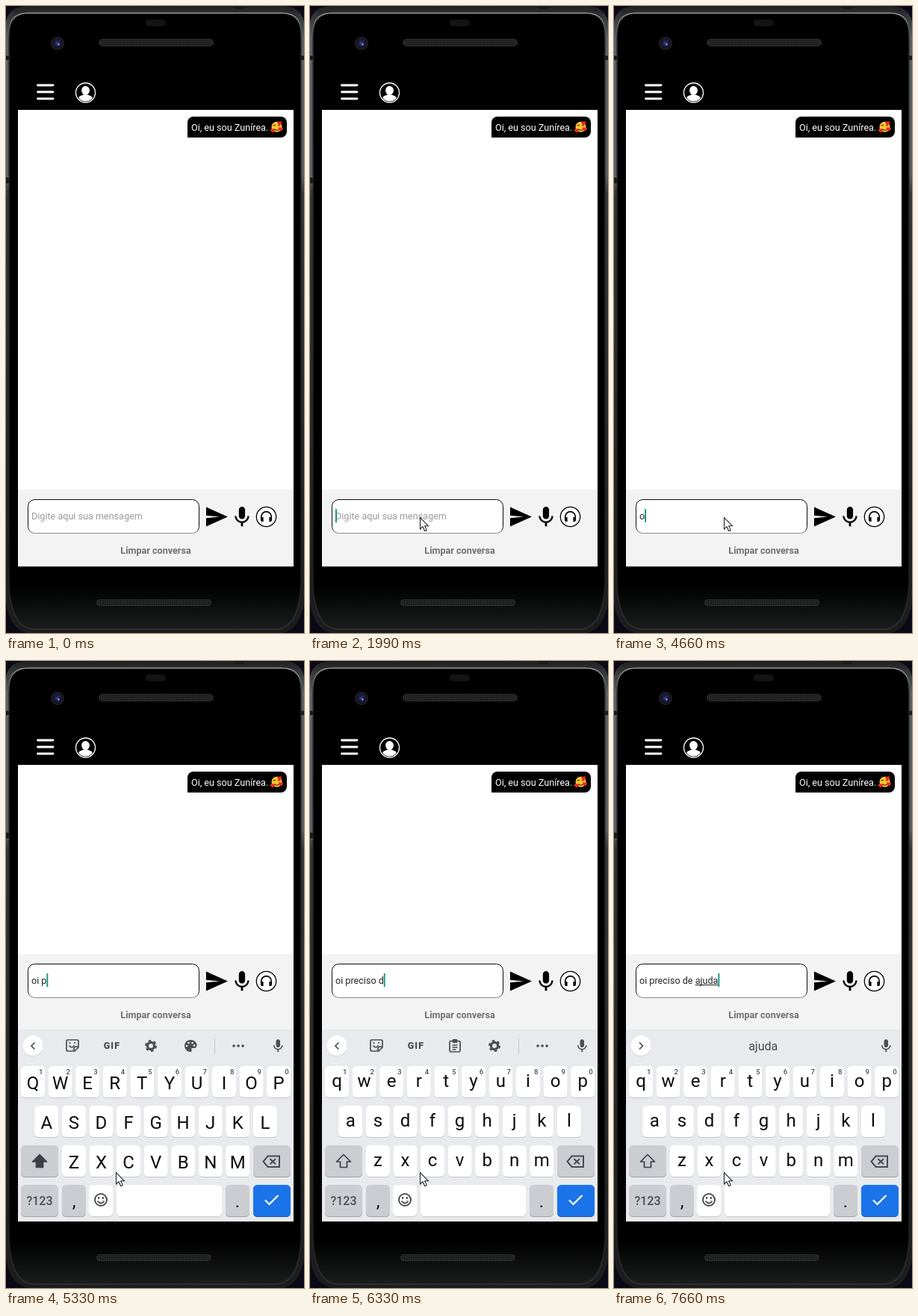
An HTML page for the animation above (7990 ms loop, 399 by 839 pixels).

```html
<!DOCTYPE html>
<html lang="pt">
<head>
<meta charset="utf-8">
<title>Chat</title>
<style>
html, body { margin: 0; width: 100%; height: 100%; overflow: hidden; background: #0a0916; }
svg { display: block; width: 399px; height: 839px; font-family: Roboto, sans-serif; }
text { white-space: pre; }
.msg { font-size: 12.6px; }
.mid { text-anchor: middle; }
.key { font-size: 24px; fill: #0b0b0c; }
.line { fill: none; stroke: #4a4d51; stroke-width: 1.7; }
.gray { fill: #4a4d51; }
.word { font-size: 16px; fill: #45484c; }
</style>
</head>
<body>
<svg id="stage" viewBox="0 0 399 839" xmlns="http://www.w3.org/2000/svg">
  <defs>
    <linearGradient id="rim" x2="0" y2="1">
      <stop offset="0" stop-color="#1d1f20"/>
      <stop offset=".05" stop-color="#5d6062"/>
      <stop offset=".27" stop-color="#5d6062"/>
      <stop offset=".3" stop-color="#343638"/>
      <stop offset="1" stop-color="#1b1c1d"/>
    </linearGradient>
    <linearGradient id="edge" x2="0" y2="1">
      <stop offset="0" stop-color="#9a9d9d"/>
      <stop offset=".04" stop-color="#2c2e2f"/>
      <stop offset=".9" stop-color="#1b1c1d"/>
      <stop offset="1" stop-color="#333536"/>
    </linearGradient>
    <linearGradient id="glass" x2="0" y2="1">
      <stop offset=".93" stop-color="#000"/>
      <stop offset="1" stop-color="#1c1d1d"/>
    </linearGradient>
    <linearGradient id="field" x2="0" y2="1">
      <stop offset=".85" stop-color="#0c0c0c"/>
      <stop offset="1" stop-color="#8c8c8c"/>
    </linearGradient>
    <radialGradient id="lens">
      <stop offset="0" stop-color="#414d96"/>
      <stop offset=".35" stop-color="#1b2048"/>
      <stop offset=".7" stop-color="#141520"/>
      <stop offset="1" stop-color="#222326"/>
    </radialGradient>
    <pattern id="mesh" width="3" height="3" patternUnits="userSpaceOnUse">
      <rect width="3" height="3" fill="#262727"/>
      <rect width="1.5" height="1.5" fill="#101111"/>
    </pattern>
    <clipPath id="face"><circle cx="106.5" cy="116" r="11.6"/></clipPath>
    <path id="mic" d="M12 14c1.66 0 3-1.34 3-3V5c0-1.66-1.34-3-3-3S9 3.34 9 5v6c0 1.66 1.34 3 3 3zm5.3-3c0 3-2.54 5.1-5.3 5.1S6.7 14 6.7 11H5c0 3.41 2.72 6.23 6 6.72V21h2v-3.28c3.28-.48 6-3.3 6-6.72z"/>
    <path id="heart" d="M0 3.6C-5 .2-3-3.4 0-1.2C3-3.4 5 .2 0 3.6z" fill="#ef2632"/>
    <g id="gear" fill="none" stroke="#4a4d51">
      <circle r="4.6" stroke-width="3.2"/>
      <circle r="7" stroke-width="2" stroke-dasharray="3.67"/>
    </g>
  </defs>

  <!-- phone -->
  <path d="M-1 30Q-1 0 30 0H369Q400 0 400 30V790Q396 840 362 840H37Q3 840-1 790z" fill="url(#rim)"/>
  <path d="M4 34Q5 9.500 30 9.500H369Q394 9.500 395 34V775Q392 834 360 834H39Q7 834 4 775z" fill="url(#glass)" stroke="url(#edge)" stroke-width="1.500"/>
  <path d="M0 66h4v7H0zM395 66h4v7h-4zM306 0h13v4h-13zM0 229h4v9H0z" fill="#17191a"/>
  <path d="M0 66h4M0 73h4M395 66h4M395 73h4M0 229h4M0 238h4" stroke="#696c6e"/>
  <rect x="187" y="18" width="27" height="9" rx="4" fill="#131314"/>
  <circle cx="69" cy="50" r="9" fill="url(#lens)"/>
  <circle cx="70.5" cy="51.5" r="1.2" fill="#8793e0"/>
  <g fill="url(#mesh)" stroke="#303131">
    <rect x="124.5" y="44.5" width="153" height="9" rx="4.5"/>
    <rect x="121.5" y="794.5" width="153" height="8" rx="4"/>
  </g>

  <!-- top bar -->
  <path d="M42.500 106h20.500M42.500 115h20.500M42.500 124h20.500" stroke="#fff" stroke-width="2.800" stroke-linecap="round"/>
  <circle cx="106.5" cy="116" r="13" fill="none" stroke="#fff" stroke-width="1.3"/>
  <g clip-path="url(#face)" fill="#fff">
    <ellipse cx="106.5" cy="113" rx="5.4" ry="6"/>
    <path d="M97 131v-7c0-3.500 4-4 7-5.500h5c3 1.500 7 2 7 5.500v7z"/>
  </g>

  <!-- chat -->
  <rect x="16" y="139" width="369" height="611" fill="#fff"/>
  <path d="M243 176V156a8 8 0 0 1 8-8h117a8 8 0 0 1 8 8v12a8 8 0 0 1-8 8z"/>
  <text class="msg" x="248" y="166.5" fill="#fff">Oi, eu sou Zunírea.</text>
  <circle cx="362.5" cy="161.8" r="7" fill="#fcc52c"/>
  <path d="M357.8 160.4q1.6-2.4 3.2 0M364 160.4q1.6-2.4 3.2 0M359 164.5q3.5 3.4 7 0" fill="none" stroke="#5d3610" stroke-width="1.1"/>
  <use href="#heart" x="357" y="166"/><use href="#heart" x="368" y="164"/><use href="#heart" x="366.3" y="156.2"/>

  <!-- composer -->
  <g id="composer">
    <rect x="16" y="647" width="369" height="103" fill="#f3f3f3"/>
    <rect x="29.5" y="660.5" width="229" height="45" rx="9" fill="#fff" stroke="url(#field)"/>
    <text id="hint" class="msg" x="34" y="687" fill="#9b9b9b">Digite aqui sua mensagem</text>
    <text id="draft" class="msg" x="34" y="687" fill="#222"></text>
    <g id="marks"></g>
    <rect id="caret" y="673" width="1.8" height="18" fill="#0a9080"/>
    <path transform="translate(265.2 666.2) scale(1.38 1.44)" d="M2 21L23 12 2 3v7.8L15 12 2 13.2z"/>
    <use href="#mic" transform="translate(299.4 667.3) scale(1.38)"/>
    <circle cx="348.5" cy="683.5" r="13.2" fill="#fff" stroke="#000" stroke-width="1.3"/>
    <path d="M341.7 686v-2.5a6.8 6.8 0 0 1 13.6 0v2.5" fill="none" stroke="#000" stroke-width="1.7"/>
    <path d="M341 684h3.6v6h-1.6a2 2 0 0 1-2-2zM356 684h-3.6v6h1.6a2 2 0 0 0 2-2z"/>
    <text class="msg mid" x="200.5" y="733" font-weight="700" fill="#707070">Limpar conversa</text>
  </g>

  <!-- keyboard -->
  <g id="keyboard">
    <rect x="16" y="493" width="369" height="257" fill="#e8eaed"/>
    <circle cx="36" cy="515.5" r="13.5" fill="#c9cbcf"/>
    <circle cx="36" cy="514.7" r="13.5" fill="#fff"/>
    <path id="chevron" class="line"/>
    <use href="#mic" class="gray" transform="translate(353.5 504.4) scale(.9)"/>
    <g id="tools">
      <path class="line" d="M83 507h12q2 0 2 2v8l-5 5h-9q-2 0-2-2v-11q0-2 2-2zM97 516h-3q-3 0-3 3v3"/>
      <path class="line" d="M84.5 514.5q3.5 5 7 0M85.5 510v2M92 510v2"/>
      <text class="mid gray" x="142" y="519.4" font-size="12.4" font-weight="800" letter-spacing="1.2">GIF</text>
      <use id="gearIcon" href="#gear" y="515"/>
      <g id="palette" class="gray">
        <path d="M247 507a8 8 0 0 0 0 16c2 0 2.2-1.6 1.5-2.5c-1-1.5 0-2.5 1.5-2.5h2c2 0 3.5-1.5 3.5-4c0-4-4-7-8.5-7z"/>
        <path d="M242 515h.1M244.5 511h.1M249.5 511h.1M252 514.5h.1" stroke="#e8eaed" stroke-width="2.6" stroke-linecap="round"/>
      </g>
      <g id="clip">
        <rect class="line" x="187" y="508.5" width="14" height="14.5" rx="1.5"/>
        <path class="line" d="M190.5 514h7M190.5 517h7M190.5 520h5"/>
        <rect class="gray" x="190.5" y="506" width="7" height="5" rx="1.5"/>
      </g>
      <path d="M279.5 505v20" stroke="#c4c7cb"/>
      <path d="M305 515h.1M311 515h.1M317 515h.1" stroke="#4a4d51" stroke-width="3.6" stroke-linecap="round"/>
    </g>
    <g id="words"></g>
    <g id="keys"></g>
    <path id="shift" d="M45 660.5l9.500 9.500h-5v7.500h-9V670h-5z" stroke="#3c4043" stroke-width="1.7" stroke-linejoin="round"/>
    <g class="line" style="stroke-width: 2">
      <path d="M350.500 662.500h15.500v14.500h-15.500l-6-7.250zM353.500 666.300l7.500 7M361 666.300l-7.500 7"/>
      <circle cx="127" cy="721" r="8"/>
      <path d="M122.500 722.500q4.500 6 9 0M124.200 717v3M129.800 717v3"/>
    </g>
    <path d="M347 721.500l5.500 5.500 12-12" fill="none" stroke="#fff" stroke-width="2.2"/>
  </g>

  <path id="pointer" d="M.5.5V16L4 12.700 6.600 18.500 9.200 17.400 6.700 11.700H11.300z" fill="#fff" stroke="#22242c" stroke-width="1.1"/>
</svg>
<script>
const LOOP = 7990, RED = "#e53238", INK = "#222";
const $ = id => document.getElementById(id);

function add(parent, tag, attrs, content = "") {
  const node = document.createElementNS("http://www.w3.org/2000/svg", tag);
  for (const name in attrs) node.setAttribute(name, attrs[name]);
  node.textContent = content;
  return parent.appendChild(node);
}

function show(id, on) { $(id).style.display = on ? "" : "none"; }

// Key caps and letters
const letters = [];
function keyCap(x, y, width, fill = "#fff") {
  const cap = { x, width, height: 42, rx: 5.5 };
  add($("keys"), "rect", { ...cap, y: y + 1, fill });
  add($("keys"), "rect", { ...cap, y: y + 1, opacity: 0.22 });
  add($("keys"), "rect", { ...cap, y, fill });
}
[["QWERTYUIOP", 20], ["ASDFGHJKL", 38.3], ["ZXCVBNM", 74.9]].forEach(([row, left], r) => {
  [...row].forEach((ch, i) => {
    const x = left + i * 36.57, y = 542 + r * 53;
    keyCap(x, y, 32);
    letters.push(add($("keys"), "text", { class: "key mid", x: x + 16, y: y + 30.5 }, ch));
    if (!r) add($("keys"), "text", { class: "mid gray", x: x + 26.7, y: y + 11, "font-size": 9.5, "font-weight": 500 }, (i + 1) % 10);
  });
});
const GRAY = "#cbcdd2";
[[20, 648, 50, GRAY], [331, 648, 50, GRAY], [20, 701, 50, GRAY], [75, 701, 32, GRAY],
 [111, 701, 32], [148, 701, 141], [294, 701, 32, GRAY], [331, 701, 50, "#1a73e8"]].forEach(k => keyCap(...k));
add($("keys"), "text", { class: "mid gray", x: 45, y: 727.5, "font-size": 16, "font-weight": 500 }, "?123");
add($("keys"), "text", { class: "key mid", x: 91, y: 731 }, ",");
add($("keys"), "text", { class: "key mid", x: 310, y: 731 }, ".");

// Each step overrides the one before; marks are [first, last, colour]
const steps = [
  [0, { pointer: null, text: "", caret: false, marks: [], keys: false, lower: false, clip: false, words: null }],
  [330, { pointer: [152, 688] }],
  [660, { pointer: [147, 684] }],
  [1320, { caret: true }],
  [1650, { caret: false }],
  [1990, { caret: true }],
  [2660, { caret: false }],
  [2990, { caret: true }],
  [3660, { caret: false }],
  [3990, { caret: true }],
  [4660, { text: "o" }],
  [5330, { text: "oi p", keys: true }],
  [5660, { text: "oi pre", marks: [[0, 2, RED], [3, 6, INK]], clip: true }],
  [6000, { text: "oi precis", marks: [[3, 9, INK]] }],
  [6330, { text: "oi preciso d", marks: [], lower: true }],
  [6660, { text: "oi preciso de aj", marks: [[14, 16, INK]] }],
  [6990, { text: "oi preciso de ajuda", marks: [[3, 10, RED], [14, 19, INK]] }],
  [7330, { marks: [[11, 13, RED], [14, 19, INK]], words: ["que", "o", "um"] }],
  [7660, { marks: [[14, 19, INK]], words: ["", "ajuda", ""] }]
];
let state = {};
const states = steps.map(([, change]) => state = { ...state, ...change });

const LEFT = 34;
function xAt(index) {
  return LEFT + (index ? $("draft").getSubStringLength(0, index) : 0);
}

function draw(s) {
  show("pointer", s.pointer);
  if (s.pointer) $("pointer").setAttribute("transform", `translate(${s.pointer})`);

  $("composer").setAttribute("transform", `translate(0 ${s.keys ? -255 : 0})`);
  show("hint", !s.text);
  $("draft").textContent = s.text;
  $("marks").replaceChildren();
  for (const [from, to, fill] of s.marks) {
    const x = xAt(from);
    add($("marks"), "rect", { x, y: 688, width: xAt(to) - x, height: fill === RED ? 1.6 : 1, fill });
  }
  show("caret", s.caret);
  $("caret").setAttribute("x", xAt(s.text.length));

  show("keyboard", s.keys);
  for (const node of letters) {
    const ch = node.textContent;
    node.textContent = s.lower ? ch.toLowerCase() : ch.toUpperCase();
    node.setAttribute("dy", s.lower ? -3 : 0);
  }
  $("shift").setAttribute("fill", s.lower ? "none" : "#3c4043");
  $("chevron").setAttribute("d", s.words ? "M34 510.5l4.5 4.5-4.5 4.5" : "M38.5 510.5l-4.5 4.5 4.5 4.5");
  show("tools", !s.words);
  show("clip", s.clip);
  show("palette", !s.clip);
  $("gearIcon").setAttribute("x", s.clip ? 247 : 194);
  $("words").replaceChildren();
  (s.words || []).forEach((w, i) => add($("words"), "text", { class: "word mid", x: 99.7 + i * 100, y: 521 }, w));
}

let shown = -1;
const start = performance.now();
function tick() {
  const t = (performance.now() - start) % LOOP;
  const now = steps.findLastIndex(([at]) => at <= t);
  if (now !== shown) draw(states[shown = now]);
  requestAnimationFrame(tick);
}
tick();
</script>
</body>
</html>
```
